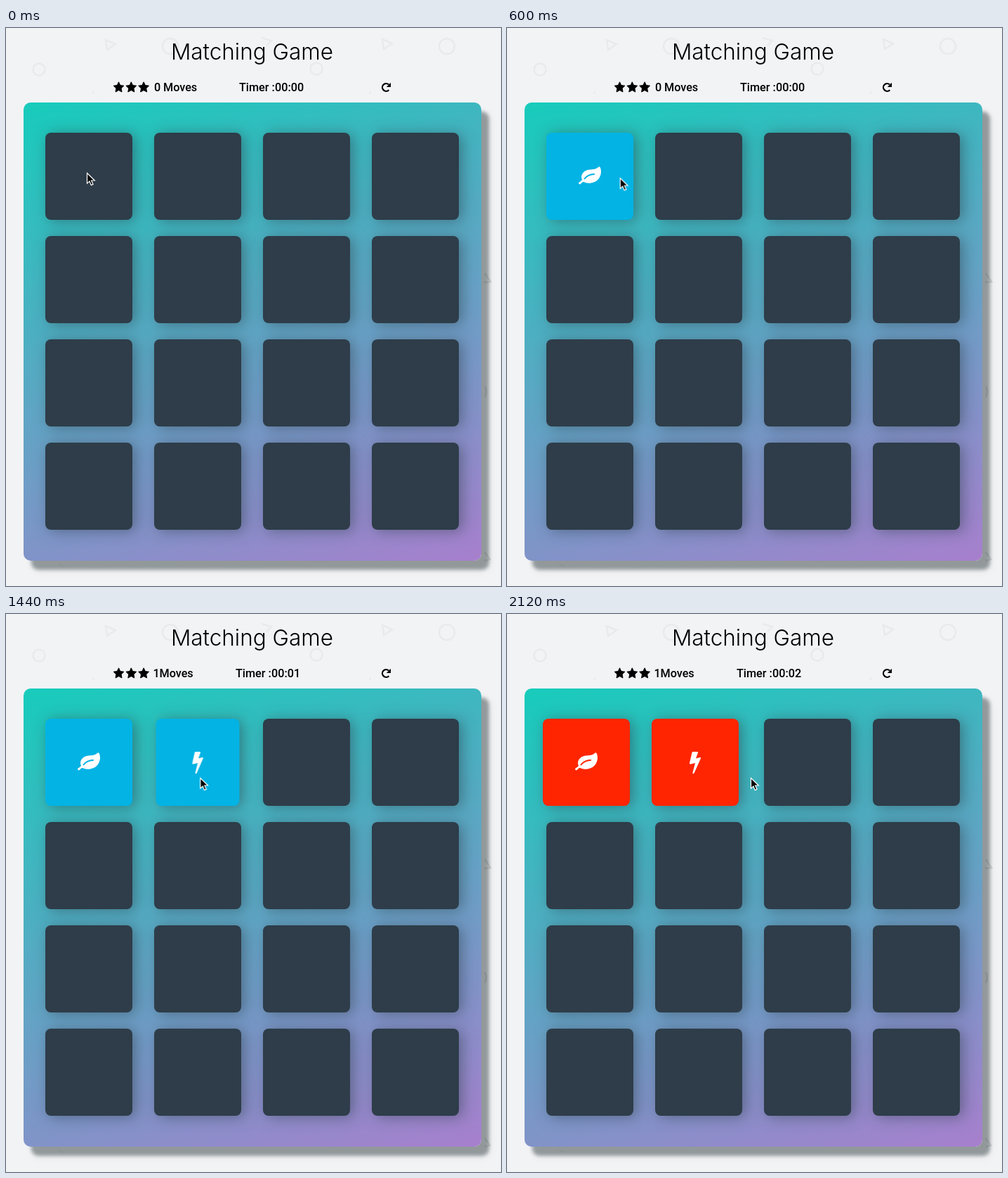
Write an HTML page that moves like this. It is 705 by 794 pixels and loops after 2160 ms.

```html
<!DOCTYPE html>
<html lang="en">
<head>
<meta charset="utf-8">
<title>Matching Game</title>
<style>
  html, body { margin: 0; width: 100%; height: 100%; overflow: hidden; background: #f2f3f5; }
  .stage { position: relative; width: 705px; height: 794px; overflow: hidden; }
  .layer { position: absolute; left: 0; top: 0; width: 705px; height: 794px; }

  .pattern { fill: none; stroke: #e9eaec; stroke-width: 2.5; }
  .pattern.dim { stroke: #46504f; stroke-opacity: .16; }
  .title { font: 300 31.5px Inter, "Liberation Sans", sans-serif; text-anchor: middle; }
  .panel { font: 500 16.2px Roboto, "Open Sans", sans-serif; }

  .deck {
    position: absolute; left: 25px; top: 106px; width: 652px; height: 652px;
    box-sizing: border-box; padding: 43px 31px; border-radius: 10px;
    display: grid; grid-template: repeat(4, 124px) / repeat(4, 124px); gap: 23px 31px;
    background: linear-gradient(160deg, #17ccbb, #a77fcd);
    box-shadow: 11px 13px 5px rgba(52, 64, 66, .48), 12px 15px 14px rgba(46, 61, 73, .06);
  }
  .card {
    color: #2e3d49; background: currentColor; border-radius: 8px;
    box-shadow: 5px 2px 20px rgba(46, 61, 73, .5);
  }
  .card svg { display: block; width: 124px; height: 124px; opacity: 0; }
  .icon { fill: #fff; }
  .vein { fill: none; stroke: currentColor; stroke-width: 2; stroke-linecap: round; }

  /* Every animation shares one 2160 ms loop. */
  .card.leaf { animation: leaf-flip 2160ms infinite, leaf-color 2160ms step-end infinite, drift 2160ms linear infinite; }
  .card.bolt { animation: bolt-flip 2160ms infinite, bolt-color 2160ms step-end infinite, drift 2160ms linear infinite; }
  .leaf svg, .first-on { animation: first-on 2160ms step-end infinite; }
  .bolt svg, .second-on { animation: second-on 2160ms step-end infinite; }
  .second-off { animation: second-off 2160ms step-end infinite; }

  @keyframes leaf-flip {
    0%, 4.48% { transform: none; }
    4.49% { transform: rotateY(180deg); animation-timing-function: ease; }
    27.64%, 100% { transform: rotateY(0deg); }
  }
  @keyframes bolt-flip {
    0%, 51.98% { transform: none; }
    51.99% { transform: rotateY(180deg); animation-timing-function: ease; }
    75.14%, 100% { transform: rotateY(0deg); }
  }
  @keyframes leaf-color { 0% { color: #2e3d49; } 4.49% { color: #02b3e4; } 75%, 100% { color: #ff2500; } }
  @keyframes bolt-color { 0% { color: #2e3d49; } 51.99% { color: #02b3e4; } 75%, 100% { color: #ff2500; } }
  @keyframes drift {
    0%, 75% { translate: 0; }
    75.93% { translate: -2px; }
    90.74% { translate: -3px; }
    98.15%, 100% { translate: -5px; }
  }
  @keyframes first-on { 0% { opacity: 0; } 4.49%, 100% { opacity: 1; } }
  @keyframes second-on { 0% { opacity: 0; } 51.99%, 100% { opacity: 1; } }
  @keyframes second-off { 0% { opacity: 1; } 51.99%, 100% { opacity: 0; } }

  .timer { animation: timer-shift 2160ms step-end infinite; }
  .t0 { animation: t0 2160ms step-end infinite; }
  .t1 { animation: t1 2160ms step-end infinite; }
  .t2 { animation: t2 2160ms step-end infinite; }
  @keyframes timer-shift { 0% { transform: none; } 51.99%, 100% { transform: translateX(-5px); } }
  @keyframes t0 { 0% { opacity: 1; } 50.8%, 100% { opacity: 0; } }
  @keyframes t1 { 0% { opacity: 0; } 50.8% { opacity: 1; } 97.1%, 100% { opacity: 0; } }
  @keyframes t2 { 0% { opacity: 0; } 97.1%, 100% { opacity: 1; } }

  .pointer { animation: travel 2160ms ease-in-out infinite; }
  .arrow { animation: arrow 2160ms step-end infinite; }
  .hand { animation: hand 2160ms step-end infinite; }
  @keyframes travel {
    0%, 21% { transform: translate(115px, 206px); }
    40%, 57.41% { transform: translate(285px, 233px); }
    72%, 79% { transform: translate(273px, 233px); }
    90.74% { transform: translate(282px, 232px); }
    98.15%, 100% { transform: translate(347px, 233px); }
  }
  @keyframes arrow { 0% { opacity: 1; } 31.5% { opacity: 0; } 51.99%, 100% { opacity: 1; } }
  @keyframes hand { 0% { opacity: 0; } 31.5% { opacity: 1; } 51.99%, 100% { opacity: 0; } }
</style>
</head>
<body>
<div class="stage">
  <svg class="layer" viewBox="0 0 705 794">
    <defs>
      <path id="star" d="M0-7.4 2.2-2.7 7.4-2 3.6 1.7 4.5 6.8 0 4.4-4.5 6.8-3.6 1.7-7.4-2-2.2-2.7Z"
        stroke="#000" stroke-width="1" stroke-linejoin="round"/>
    </defs>
    <g class="pattern">
      <path d="M142 17 156 23 144 31ZM536 16 550 22 538 30ZM364 14 378 18 371 25"/>
      <circle cx="47" cy="59" r="8.5"/>
      <circle cx="442" cy="58" r="8.5"/>
      <circle cx="234" cy="26" r="11"/>
      <circle cx="628" cy="26" r="11"/>
      <path d="M123 92h3M517 92h3M74 763 82 766"/>
    </g>
    <text class="title" x="350.5" y="45">Matching Game</text>
    <use href="#star" x="160.5" y="84.2"/>
    <use href="#star" x="178.3" y="84.2"/>
    <use href="#star" x="196.1" y="84.2"/>
    <g class="panel">
      <g class="second-off"><text x="211" y="90">0</text><text x="224" y="90">Moves</text></g>
      <g class="second-on"><text x="209.5" y="90">1</text><text x="218.5" y="90">Moves</text></g>
      <g class="timer">
        <text x="332" y="90">Timer :</text>
        <text class="t0" x="383" y="90">00:00</text>
        <text class="t1" x="383" y="90">00:01</text>
        <text class="t2" x="383" y="90">00:02</text>
      </g>
    </g>
    <path d="M545.3 88.2A5.4 5.4 0 1 1 545 80.4" fill="none" stroke="#000" stroke-width="2.2"/>
    <path d="M548 77.8v6.2h-6.2Z"/>
  </svg>

  <div class="deck"></div>

  <svg class="layer" viewBox="0 0 705 794">
    <g class="pattern dim">
      <path d="M682 349 690 361 681 362M682 510Q686 517 682 525M682 746 689 756 682 758"/>
    </g>
    <g class="pointer">
      <path class="arrow" d="M.5.5V15.2L3.9 12 6.3 17.6 9 16.4 6.6 11H11.3Z" stroke="#fff" stroke-width="1.2"/>
      <g class="hand" fill="#fff" stroke="#000" stroke-width="1" stroke-linejoin="round">
        <path d="M-3 2.4Q-3.3.8-1.8.7-.5.6 0 2L1.6 6.6Q2-5 4.1 6.2 4.8 5.2 6.6 6.6 7.6 5.8 8.8 7.4 10.5 7.3 10.2 10L9 14.3V17H1.3L-2.8 11.8Q-5.4 9.3-3.9 8.5-2.5 8-1 9.8Z"/>
        <path d="M3 11v3.5M5.2 11v3.5M7.4 11v3.5" stroke-width=".8"/>
      </g>
    </g>
  </svg>
</div>
<script>
  const icons = {
    leaf: `<path class="icon" d="M-16 9C-14 8-12 6-11 5-13 1-12-4-7-7.5-1-11 7-8 12-13Q13.5-14.5 14.5-13
      C16.8-9 16.5-2 13 3 9 8.5 2 10.5-4 9.5-7 9-9 7.6-10 8-12 9-13 11.5-14.5 11.5Q-16 11-16 9Z"/>
      <path class="vein" d="M-7.5 3.5Q-3-2.6 6-3"/>`,
    bolt: `<path class="icon" d="M-4.5-14Q-4.2-15-3-15H3Q4.5-15 4-13.5L1-5.5 7-7Q8.5-7 8-5.5L-1.5 15.5
      Q-2 16.5-3.5 16-4 15.5-3.5 14.5L0 1-7 2.7Q-8.5 2.5-8 1Z"/>`
  };
  const names = Object.keys(icons);
  document.querySelector('.deck').innerHTML = Array.from({ length: 16 }, (_, i) => {
    const name = names[i];
    return name
      ? `<div class="card ${name}"><svg viewBox="-62 -62 124 124">${icons[name]}</svg></div>`
      : '<div class="card"></div>';
  }).join('');
</script>
</body>
</html>
```
